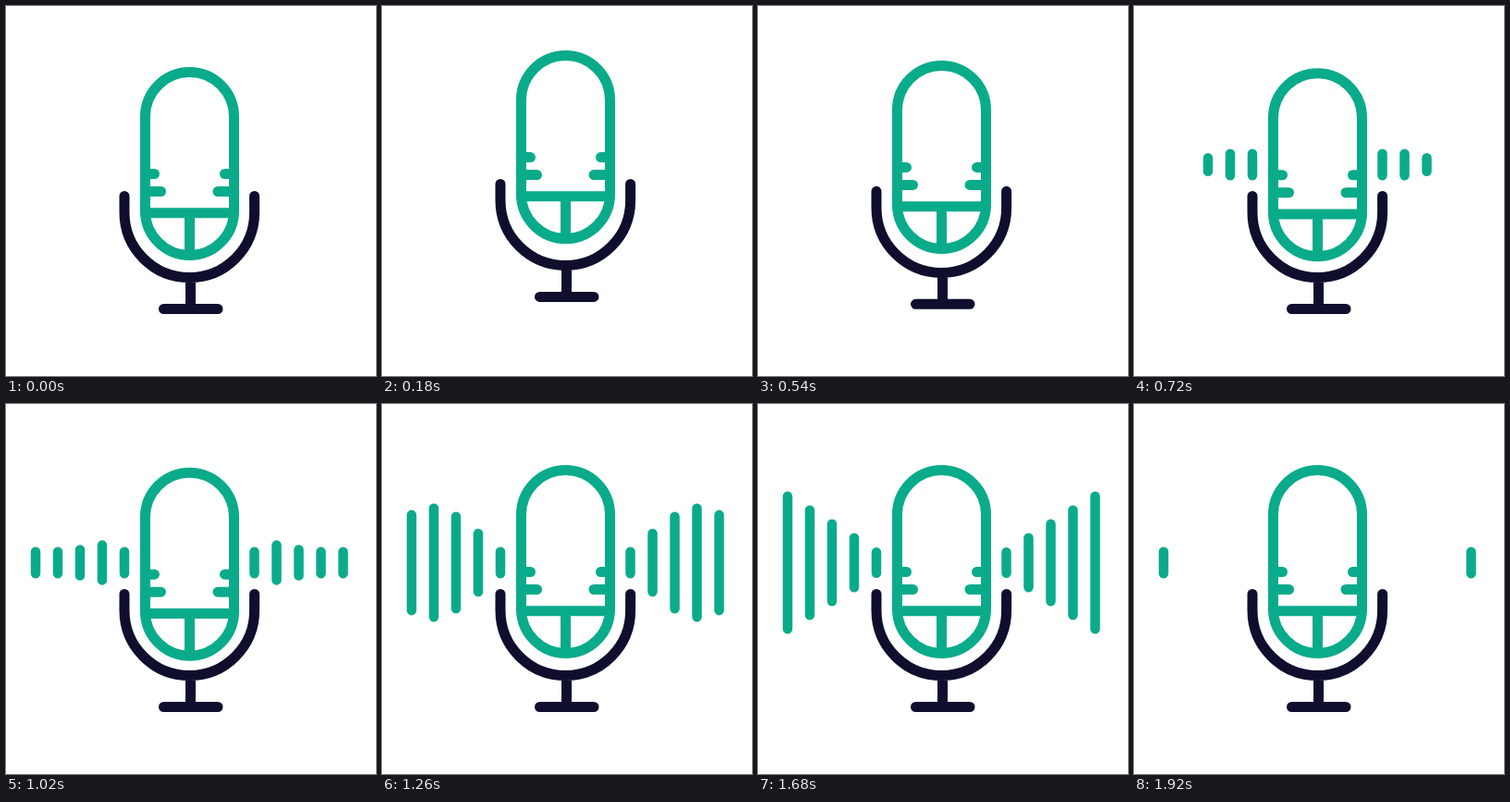
Animation of 400x400 px, one loop 3950 ms. Source, as an HTML page:

```html
<!DOCTYPE html>
<html lang="en">
<head>
<meta charset="utf-8">
<title>Microphone</title>
<style>
  html, body { margin: 0; width: 100%; height: 100%; overflow: hidden; background: #fff; }
  svg { display: block; width: 100%; height: 100%; fill: none; stroke-linecap: round; }
  #mic { stroke: #0aab8a; stroke-width: 11; }
  #bars { stroke: #0aab8a; stroke-width: 10.5; }
  #stand { stroke: #0f0e2d; stroke-width: 11; }
</style>
</head>
<body>
<svg viewBox="0 0 400 400">
  <g id="stand">
    <path d="M128 205.5V223.3A70.3 70.3 0 0 0 268.6 223.3V205.5M199.5 294V327.5M170.5 327.5H229"/>
  </g>
  <g id="mic">
    <rect x="150.5" y="71.5" width="96" height="198" rx="48"/>
    <path d="M151 223.8H246M198.5 224V269"/>
    <path d="M151 181.5H160.5M151 200.5H167.5M246 181.5H236.5M246 200.5H229"/>
  </g>
  <g id="bars"></g>
</svg>
<script>
  const LOOP = 3950, STEP = 30, LAST = 1920;
  const BARS = 5, GAP = 24, CAP = 10.5, MIDDLE = 171.5;

  const ramp = (t, start, duration) => Math.min(1, Math.max(0, (t - start) / duration));
  const smooth = p => p * p * (3 - 2 * p);

  // Rises from 0 to 1 and falls back.
  const hop = t => smooth(ramp(t, 0, 340)) - smooth(ramp(t, 340, 285));
  const sag = t => Math.sin(Math.PI * ramp(t, 640, 590));

  // Swings once past 1, then rests there.
  function spring(t, start) {
    const s = 540 * ramp(t, start, 540);
    return 1 - Math.exp(-s / 300) * Math.cos(Math.PI * s / 360);
  }

  // Each bar pops in, swells to its full height and shrinks, later the further out it is.
  function barHeight(i, t) {
    const pop = 34 * smooth(ramp(t, 540 + 60 * i, 90));
    const swell = 30 * i * spring(t, 860 + 70 * i);
    return (pop + swell) * (1 - ramp(t, 1675 + 33 * i, 145));
  }

  const byId = id => document.getElementById(id);
  const moveY = (id, y) => byId(id).setAttribute('transform', `translate(0 ${y})`);

  const bars = Array.from({ length: BARS }, () => {
    const path = document.createElementNS('http://www.w3.org/2000/svg', 'path');
    byId('bars').append(path);
    return path;
  });

  function draw(t) {
    moveY('mic', 3 * sag(t) - 33 * hop(t));
    moveY('stand', -24 * hop(t));
    bars.forEach((bar, i) => {
      const height = barHeight(i, t);
      const half = (height - CAP) / 2;
      const line = x => `M${x} ${MIDDLE - half}V${MIDDLE + half}`;
      bar.setAttribute('d', height > CAP ? line(128 - GAP * i) + line(268.5 + GAP * i) : '');
    });
  }

  function tick() {
    const t = performance.now() % LOOP;
    draw(Math.min(Math.floor(t / STEP) * STEP, LAST));
    requestAnimationFrame(tick);
  }
  tick();
</script>
</body>
</html>
```
